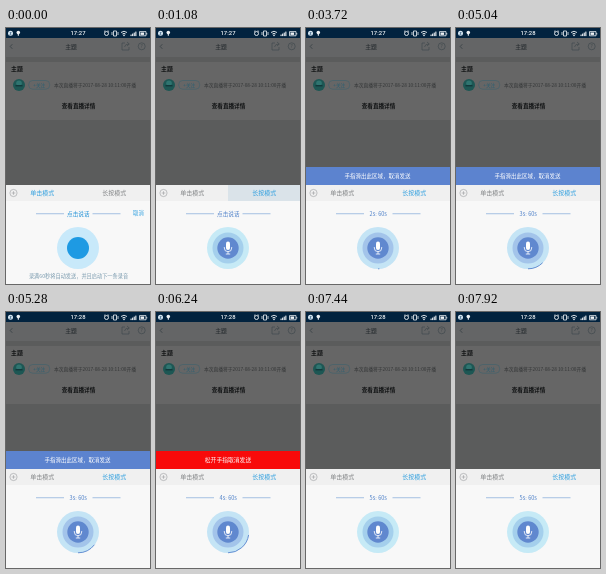
Animation of 144x256 px, one loop 8 s. Source, as an HTML page with a canvas:

```html
<!DOCTYPE html>
<html lang="zh">
<head>
<meta charset="utf-8">
<style>
html, body { margin: 0; height: 100%; overflow: hidden; background: #5c5c5c; }
canvas { display: block; width: 100vw; height: 100vh; }
</style>
</head>
<body>
<canvas id="stage"></canvas>
<script>
const canvas = document.getElementById('stage');
const g = canvas.getContext('2d');
const LOOP = 8000, W = 144, H = 256;
const SWITCH = 720, PRESS = 3120, RELEASE = 7320, CLOCK = 4560;
const CANCEL = [[4680, 4920], [6240, 6600]];
const FONT = '"Noto Sans CJK SC", "Noto Sans CJK", Roboto, sans-serif';
const clamp = v => Math.max(0, Math.min(1, v));

function rect(x, y, w, h, color) {
  g.fillStyle = color;
  g.fillRect(x, y, w, h);
}

function text(s, x, y, size, color, align = 'center', weight = 500, font = FONT) {
  g.font = `${weight} ${size}px ${font}`;
  g.textAlign = align;
  g.textBaseline = 'middle';
  g.fillStyle = color;
  g.fillText(s, x, y);
}

function disc(x, y, r, color) {
  g.fillStyle = color;
  g.beginPath();
  g.arc(x, y, r, 0, 7);
  g.fill();
}

function stroke(d, color, width = 0.7) {
  g.strokeStyle = color;
  g.lineWidth = width;
  g.stroke(new Path2D(d));
}

function ring(x, y, r, color, width = 0.7) {
  g.strokeStyle = color;
  g.lineWidth = width;
  g.beginPath();
  g.arc(x, y, r, 0, 7);
  g.stroke();
}

function statusBar(t) {
  const ink = '#eef2f5';
  rect(0, 0, W, 10, '#02233f');
  disc(4.5, 5.3, 2.5, '#d5e6f2');
  stroke('M3.8 4.5 H5.2 L3.9 6.4 H5.3', '#1c4a70', 0.6);
  disc(12.3, 4.6, 1.8, ink);
  rect(11.8, 5.5, 1, 2.3, ink);
  text(t < CLOCK ? '17:27' : '17:28', 72, 5.6, 5.9, ink, 'center', 500, 'Roboto, sans-serif');
  ring(100.5, 5.5, 2, ink, 0.9);
  stroke('M98 3.6 L99.3 2.6 M103 3.6 L101.7 2.6', ink, 0.8);
  stroke('M107.5 3 H110.5 V8 H107.5 Z M106 4 V7 M112 4 V7', ink, 0.8);
  stroke('M115 4.5 Q118 2 121 4.5 M116.4 6 Q118 4.7 119.6 6', ink, 0.9);
  disc(118, 7.4, 0.8, ink);
  for (let i = 0; i < 4; i++) rect(124.5 + i * 1.6, 6.6 - i, 1.1, 1.5 + i, ink);
  stroke('M133.5 3.6 H140 V7.8 H133.5 Z', ink, 0.8);
  rect(134.5, 4.5, 3.6, 2.4, ink);
  rect(140.4, 5, 0.8, 1.5, ink);
}

function page() {
  rect(0, 10, W, H, '#5b5c5c');
  rect(0, 10, W, 19, '#646566');
  stroke('M6.3 16.2 L4.2 18.5 L6.3 20.8', '#303a40');
  text('主题', 65, 18.8, 5.8, '#1e2428');
  stroke('M119 15 H116 V22 H123 V19 M118.5 19 Q119 16 123 16 M121 14 L123.3 16 L121 18', '#3c454a', 0.6);
  ring(135.7, 18.3, 3.5, '#3c454a', 0.6);
  text('?', 135.7, 18.5, 4.8, '#3c454a');
  rect(0, 34, W, 58, '#666');
  text('主题', 5, 41.2, 5.9, '#111314', 'left', 700);
  disc(13, 57, 6, '#1d5754');
  disc(13, 55.2, 2.8, '#2f7470');
  rect(9.5, 57, 7, 1.4, '#12383a');
  g.strokeStyle = '#34606f';
  g.lineWidth = 0.5;
  g.beginPath();
  g.roundRect(22.7, 52.5, 21, 8.7, 4);
  g.stroke();
  text('+关注', 33.2, 57, 4.6, '#2b5f72', 'center', 400);
  text('本次直播将于2017-08-28 10:11:00开播', 48, 57.3, 4.75, '#333536', 'left', 400);
  text('查看直播详情', 72.5, 78, 5.6, '#111314', 'center', 700);
}

function tabs(t, hold) {
  rect(0, 157, W, 99, '#f8f8f8');
  rect(0, 157, W, 16, '#f0f0f0');
  const glow = clamp((t - 480) / 240) * clamp((1380 - t) / 300);
  rect(72, 157, 72, 16, `rgba(195,212,224,${glow * 0.5})`);
  ring(7.5, 165, 3.6, '#9a9d9f', 0.6);
  stroke('M5.7 165 H9.3 M7.5 163.2 V166.8', '#9a9d9f', 0.6);
  const on = '#2f9fdf', off = '#808385';
  text('单击模式', 36.2, 165.2, 6, hold ? off : on);
  text('长按模式', 108.2, 165.2, 6, hold ? on : off);
}

function caption(s, ink) {
  rect(30, 185.4, 28, 0.8, '#8fb2dd');
  rect(86.5, 185.4, 28, 0.8, '#8fb2dd');
  text(s, 72.3, 186, 5.6, ink);
}

function tapButton() {
  caption('点击说话', '#1d8fd6');
  text('取消', 132.5, 185, 5.4, '#2f9fdf');
  disc(72, 220, 21, '#c8e9fa');
  disc(72, 220, 11, '#1e9ae3');
  text('录满60秒将自动发送，并且启动下一条录音', 72.5, 248, 5.2, '#7899ad', 'center', 400);
}

function holdButton(t, recording) {
  const secs = t < 3720 ? 1 : Math.min(5, 2 + Math.floor((t - 3720) / 960));
  caption(t < PRESS ? '点击说话' : `${secs}s: 60s`, '#4c7fc8');
  disc(72, 220, 21, recording ? '#c4e4f5' : '#c6eaf6');
  disc(72, 220, 15.5, recording ? '#a3c4ea' : '#a4cfec');
  if (recording) {
    // progress runs up the right side from the bottom
    const angle = clamp((t - 3600) / 11600) * Math.PI * 2;
    g.strokeStyle = '#5b86cf';
    g.lineWidth = 0.9;
    g.beginPath();
    g.arc(72, 220, 20.8, Math.PI / 2, Math.PI / 2 - angle, true);
    g.stroke();
  }
  disc(72, 220, 10.7, '#6088cf');
  g.fillStyle = '#fff';
  g.beginPath();
  g.roundRect(70, 213.5, 4, 8.5, 2);
  g.fill();
  stroke('M68.3 219 V220 A3.7 3.7 0 0 0 75.7 220 V219 M72 223.7 V226 M69.8 226 H74.2', '#fff', 0.8);
}

function banner(t) {
  const cancel = CANCEL.some(([a, b]) => t >= a && t < b);
  rect(0, 139, W, 18, cancel ? '#f80a0a' : '#5c83cf');
  if (cancel) text('松开手指取消发送', 72, 148, 5.8, '#fff');
  else text('手指滑出此区域，取消发送', 71.5, 148, 5.5, '#fff');
}

function draw(t) {
  const hold = t >= SWITCH;
  const recording = t >= PRESS && t < RELEASE;
  page();
  statusBar(t);
  tabs(t, hold);
  if (hold) holdButton(t, recording);
  else tapButton();
  if (recording) banner(t);
}

function frame(now) {
  const dpr = devicePixelRatio || 1;
  const w = Math.round(innerWidth * dpr), h = Math.round(innerHeight * dpr);
  if (canvas.width !== w || canvas.height !== h) {
    canvas.width = w;
    canvas.height = h;
  }
  g.setTransform(w / W, 0, 0, h / H, 0, 0);
  draw(now % LOOP);
  requestAnimationFrame(frame);
}
frame(0);
</script>
</body>
</html>
```
